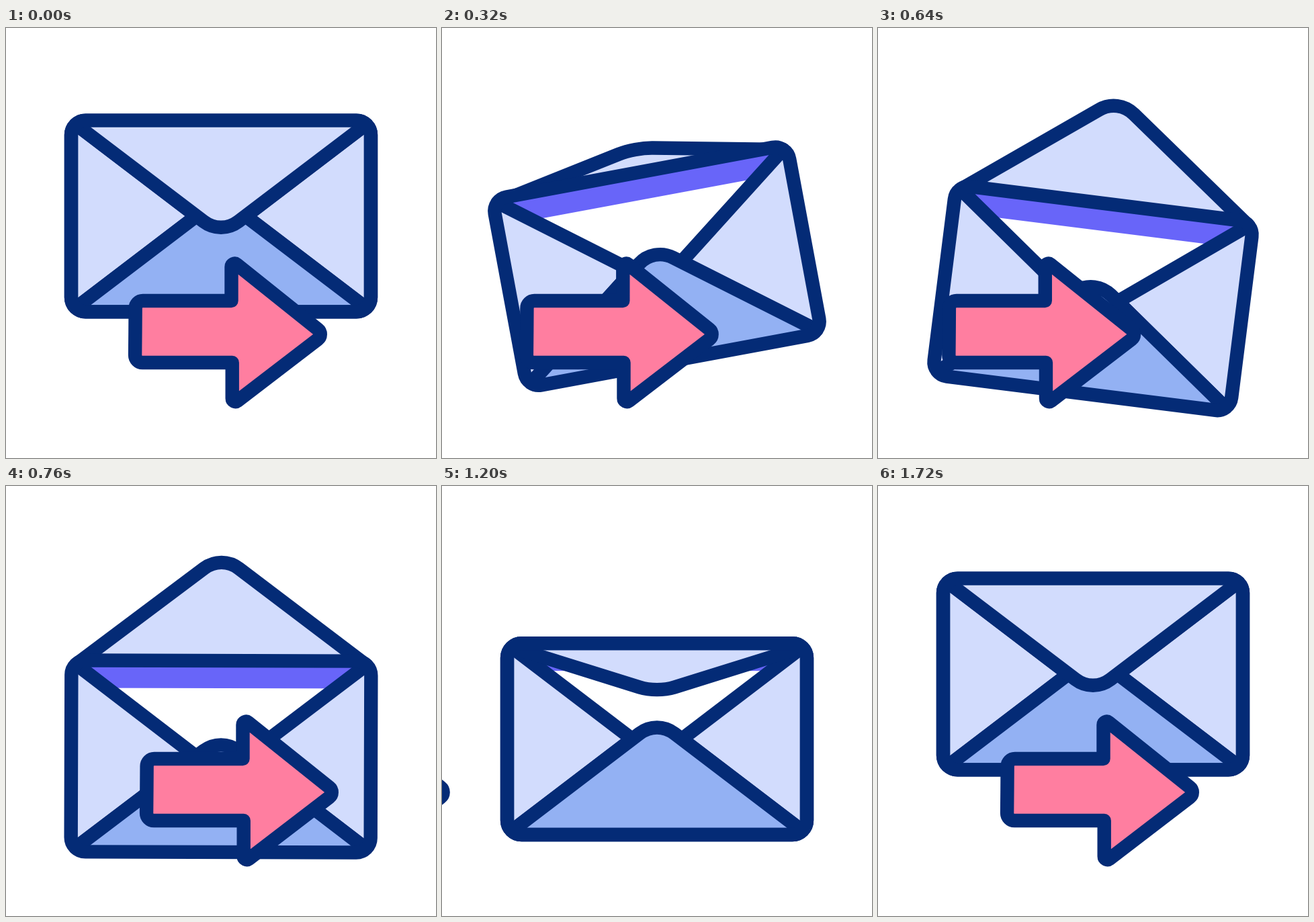
Recreate the animation shown at these times as an HTML page with a canvas. Size 640x640 px, loop 2000 ms.

```html
<!DOCTYPE html>
<html lang="en">
<head>
<meta charset="utf-8">
<title>Send mail</title>
<style>
  html, body { margin: 0; width: 100%; height: 100%; overflow: hidden; background: #fff; }
  canvas { display: block; width: 100vmin; height: 100vmin; }
</style>
</head>
<body>
<canvas id="stage" width="640" height="640"></canvas>
<script>
const ctx = document.getElementById('stage').getContext('2d');

const LOOP = 2000, STEP = 40;
const NAVY = '#042b76', LIGHT = '#d2dcfd', BLUE = '#93b1f3';
const PURPLE = '#6865f9', PINK = '#ff7ea0', WHITE = '#fff';

// Envelope half sizes and the point where the diagonals leave the corner.
const HALF_W = 223, HALF_H = 142.4;
const EDGE_X = 216, EDGE_Y = 136.5;
const FLAP_CLOSED = 170, FLAP_OPEN = -157;

const clamp = v => Math.min(1, Math.max(0, v));
const mix = (a, b, p) => a + (b - a) * p;
const smooth = u => u * u * (3 - 2 * u);

// Each key is [time, value]; values ease in and out between keys.
function track(keys, t) {
  let value = keys[0][1];
  for (let i = 1; i < keys.length; i++) {
    const [t0, v0] = keys[i - 1], [t1, v1] = keys[i];
    if (t > t0) value = mix(v0, v1, smooth(clamp((t - t0) / (t1 - t0))));
  }
  return value;
}

const LIFT = [[117, 280], [471, 402.5], [1104.5, 402.5], [1427, 280]];
const TILT = [[36, 0], [403, -12.1], [607, 8], [774, 0]];
const FLAP = [[205, FLAP_CLOSED], [400, FLAP_OPEN], [1072, FLAP_OPEN], [1272, FLAP_CLOSED]];

function arrowShift(t) {
  if (t < 545) return track([[48, 0], [545, -116]], t);
  if (t < 1130) {
    const u = clamp((t - 545) / 580);
    return -116 + 594 * u * u * (2 - u);
  }
  return -848 * smooth(clamp((1690 - t) / 919));
}

function paint(fill) {
  ctx.fillStyle = fill;
  ctx.fill();
  ctx.stroke();
}

// A triangle with a rounded tip, open along the line y = baseY.
function triangle(baseY, tipY, fill) {
  const near = 26, pull = near * 0.4;
  const edgeY = x => mix(tipY, baseY, x / EDGE_X);
  ctx.beginPath();
  ctx.moveTo(-EDGE_X, baseY);
  ctx.lineTo(-near, edgeY(near));
  ctx.bezierCurveTo(-pull, edgeY(pull), pull, edgeY(pull), near, edgeY(near));
  ctx.lineTo(EDGE_X, baseY);
  paint(fill);
}

function frame() {
  ctx.beginPath();
  ctx.roundRect(-HALF_W, -HALF_H, 2 * HALF_W, 2 * HALF_H, 21.5);
}

function sidePanel(dir) {
  ctx.beginPath();
  ctx.moveTo(dir * EDGE_X, -EDGE_Y);
  ctx.lineTo(dir * 37, 0);
  ctx.lineTo(dir * EDGE_X, EDGE_Y);
  paint(LIGHT);
}

function body() {
  frame();
  ctx.fillStyle = PURPLE;
  ctx.fill();
  ctx.fillStyle = WHITE;
  ctx.fillRect(-HALF_W + 5, -101.5, 2 * HALF_W - 10, HALF_H + 95);
  sidePanel(-1);
  sidePanel(1);
  triangle(EDGE_Y, -28, BLUE);
  frame();
  ctx.stroke();
}

function envelope(t) {
  const tip = track(FLAP, t);
  const flap = () => triangle(-EDGE_Y, tip - HALF_H, LIGHT);
  ctx.save();
  ctx.translate(320, track(LIFT, t));
  ctx.rotate(track(TILT, t) * Math.PI / 180);
  if (tip < 0) {
    flap();
    body();
  } else {
    body();
    flap();
    frame();
    ctx.stroke();
  }
  ctx.restore();
}

// Corners as [x, y, radius].
const ARROW = [
  [192.7, 406, 11], [335.5, 406, 0], [335.5, 345.5, 4.8], [473.7, 456, 9.5],
  [336.7, 561, 4.8], [336.7, 498, 0], [192, 498, 11]
];

function arrow(shift) {
  ctx.save();
  ctx.translate(shift, 0);
  ctx.beginPath();
  ctx.moveTo(192.4, 452);
  ARROW.forEach(([x, y, r], i) => {
    const [nx, ny] = ARROW[(i + 1) % ARROW.length];
    ctx.arcTo(x, y, nx, ny, r);
  });
  ctx.closePath();
  paint(PINK);
  ctx.restore();
}

function draw(now) {
  const t = Math.floor((now % LOOP) / STEP) * STEP;
  ctx.fillStyle = WHITE;
  ctx.fillRect(0, 0, 640, 640);
  ctx.strokeStyle = NAVY;
  ctx.lineWidth = 20.4;
  ctx.lineJoin = ctx.lineCap = 'round';
  envelope(t);
  arrow(arrowShift(t));
}

const start = performance.now();
function tick() {
  draw(performance.now() - start);
  requestAnimationFrame(tick);
}
tick();
</script>
</body>
</html>
```
